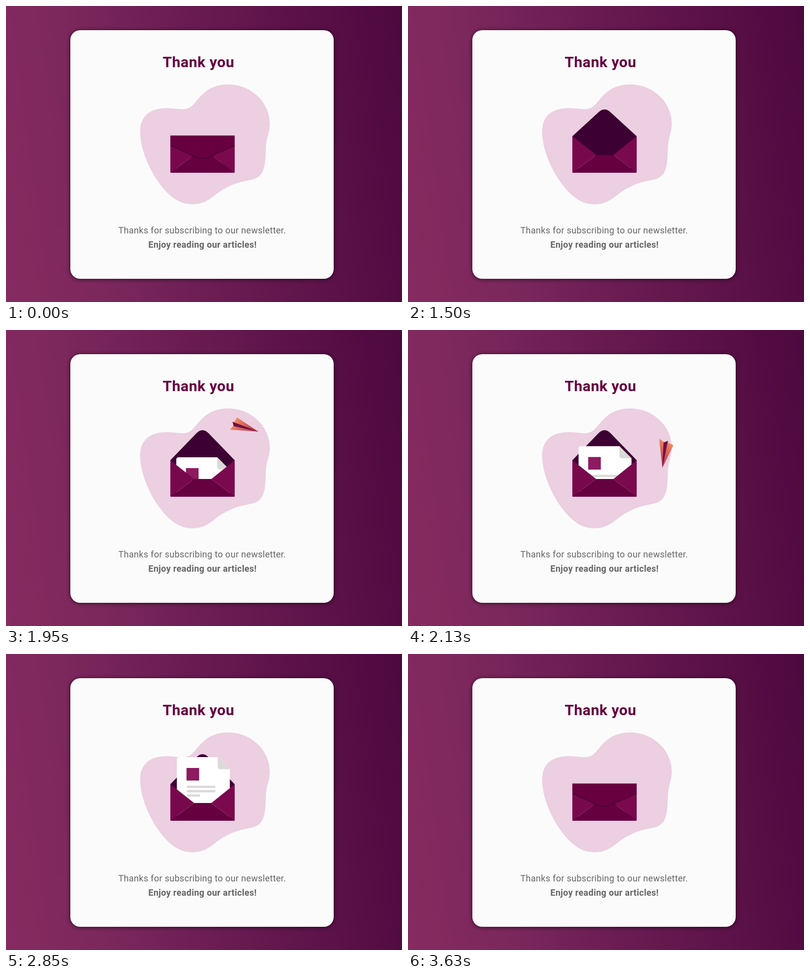
Recreate the animation shown at these times as an HTML page with a canvas. Size 800 by 600 pixels, loop 3900 ms.

```html
<!DOCTYPE html>
<html lang="en">
<head>
<meta charset="utf-8">
<title>Thank you</title>
<style>
  html, body { margin: 0; width: 100%; height: 100%; overflow: hidden; }
  body { position: relative; background: linear-gradient(82deg, #862a60, #7c285d 22%, #671a50 55%, #520b42 92%, #4d0a3f); }
  .card { position: absolute; left: 130px; top: 49px; width: 532px; height: 504px;
    border-radius: 20px; background: #fbfbfb; box-shadow: 0 1px 9px rgba(20, 0, 15, .75); }
  canvas { position: absolute; left: 0; top: 0; }
  p { position: absolute; margin: 0; white-space: nowrap; color: #666;
    font: 18px/30px Roboto, sans-serif; letter-spacing: .3px; }
  .title { left: 316.5px; top: 99px; font-size: 30px; font-weight: 700; letter-spacing: .5px; color: #66003f; }
  .thanks { left: 227px; top: 440px; }
  .enjoy { left: 287.5px; top: 469px; font-weight: 700; }
</style>
</head>
<body>
<div class="card"></div>
<canvas width="800" height="600"></canvas>
<p class="title">Thank you</p>
<p class="thanks">Thanks for subscribing to our newsletter.</p>
<p class="enjoy">Enjoy reading our articles!</p>
<script>
const LOOP = 3900, STEP = 30;
const ctx = document.querySelector('canvas').getContext('2d');
const DARK = '#3d0033', FLAP = '#680040', SIDE = '#78084c', FRONT = '#66003f', GREY = '#dbdad7';

const blob = new Path2D(`M271 258C270 225 288 207 325 207C345 207 362 214 375 203
  C390 190 402 159 449 159C497 159 533 197 533 238C533 256 526 265 525 288
  C524 318 524 344 500 351C482 356 467 355 435 374C419 384 406 402 377 402
  C349 402 328 385 308 357C287 327 272 289 271 258Z`);
const sheet = new Path2D('M0 130V5Q0 0 5 0H82.5L107 24.5V130Z');
const fold = new Path2D('M82.5 0V19Q82.5 24.5 88 24.5H107Z');

// time, tip x, tip y, heading, left wing length, right wing length, half width
const flight = [
  [1590, 365, 292, -155, 52, 52, 16],
  [1650, 310, 254, -120, 55, 50, 18],
  [1710, 308, 190, -71, 58, 46, 20],
  [1740, 337, 166, -56, 58, 47, 20],
  [1830, 425, 158, -15, 54, 51, 17],
  [1950, 510, 206, 18, 50, 56, 14],
  [2100, 524, 268, 85, 49, 57, 15],
  [2280, 425, 331, 165, 47, 58, 16],
  [2340, 375, 337, 181, 47, 59, 16],
  [2430, 322, 326, 196, 47, 59, 16]
];

const clamp = v => Math.max(0, Math.min(1, v));
const progress = (t, start, end) => clamp((t - start) / (end - start));
const mix = (a, b, u) => a + (b - a) * u;
const cubicOut = u => 1 - (1 - u) ** 3;
const backOut = u => 1 + 2.70158 * (u - 1) ** 3 + 1.70158 * (u - 1) ** 2;
const sineInOut = u => (1 - Math.cos(Math.PI * u)) / 2;

function polygon(color, ...points) {
  ctx.fillStyle = color;
  ctx.beginPath();
  for (let i = 0; i < points.length; i += 2) ctx.lineTo(points[i], points[i + 1]);
  ctx.fill();
}

function fillPath(color, path) {
  ctx.fillStyle = color;
  ctx.fill(path);
}

function bar(color, x, y, w, h, r) {
  ctx.fillStyle = color;
  ctx.beginPath();
  ctx.roundRect(x, y, w, h, r);
  ctx.fill();
}

// Smooth curve through the flight keys
function flightAt(t) {
  let i = 0;
  while (i < flight.length - 2 && t > flight[i + 1][0]) i++;
  const a = flight[i], b = flight[i + 1];
  const before = flight[i - 1] || a, after = flight[i + 2] || b;
  const span = b[0] - a[0], u = (t - a[0]) / span;
  return a.slice(1).map((va, k) => {
    const vb = b[k + 1];
    const slopeA = (vb - before[k + 1]) / (b[0] - before[0]) * span;
    const slopeB = (after[k + 1] - va) / (after[0] - a[0]) * span;
    return va + u * slopeA + u * u * (3 * (vb - va) - 2 * slopeA - slopeB)
      + u ** 3 * (2 * (va - vb) + slopeA + slopeB);
  });
}

function drawPlane(t) {
  if (t < 1590 || t > 2430) return;
  const [x, y, heading, left, right, w] = flightAt(t);
  const wing = ctx.createLinearGradient(-10, 4, -55, -12);
  wing.addColorStop(0, '#b63f57');
  wing.addColorStop(.5, '#d8645a');
  wing.addColorStop(1, '#f3965f');
  ctx.save();
  ctx.translate(x, y);
  ctx.rotate(heading * Math.PI / 180);
  ctx.globalAlpha = progress(t, 1590, 1650) * (1 - progress(t, 2360, 2430));
  polygon(wing, 0, 0, -left, -w, -54, w * .1);
  polygon(wing, 0, 0, -52, w * .3, -right, w);
  polygon('#6f1142', 0, 0, -56, -w * .2, -51, w * .35);
  ctx.restore();
}

function drawLetter(t) {
  const y = t < 2700
    ? mix(307, 209, sineInOut(progress(t, 1356, 2543)))
    : mix(209, 307, progress(t, 2880, 3360) ** 3);
  ctx.save();
  ctx.beginPath();
  ctx.rect(333, 150, 128, 187);
  ctx.clip();
  ctx.translate(345 - (y - 216) / 42, y);
  fillPath('#fff', sheet);
  fillPath(GREY, fold);
  bar('#8e1a60', 19.5, 22, 25.5, 25.5, 0);
  [58, 58, 27].forEach((width, i) => bar(GREY, 20, 58 + i * 8.8, width, 4.6, 2));
  ctx.restore();
}

function drawFlap(base, shoulder, tip) {
  const at = k => mix(shoulder, tip, k);
  const closed = tip > base;
  const edge = () => {
    ctx.lineTo(332, shoulder);
    ctx.lineTo(385, at(.9));
    ctx.quadraticCurveTo(397, at(1.1), 409, at(.9));
    ctx.lineTo(462, shoulder);
  };
  ctx.fillStyle = closed ? FLAP : DARK;
  ctx.beginPath();
  ctx.moveTo(332, base);
  edge();
  ctx.lineTo(462, base);
  ctx.fill();
  if (!closed) return;
  ctx.strokeStyle = '#4b0034';
  ctx.lineWidth = 1.8;
  ctx.beginPath();
  edge();
  ctx.stroke();
}

function drawPocket() {
  polygon(SIDE, 332, 264, 380, 302, 332, 338);
  polygon('#7b094e', 462, 264, 415, 302, 462, 338);
  polygon(FRONT, 332, 338, 380, 302, 415, 302, 462, 338);
}

function draw(t) {
  const open = t < 3240
    ? cubicOut(progress(t, 1200, 1700))
    : 1 - backOut(progress(t, 3240, 3630));
  const base = mix(262.5, 264, clamp(open * 6));
  const shoulder = mix(283, base, Math.min(1, open * 2));
  const tip = 309 - 106 * open;
  const flap = () => drawFlap(base, shoulder, tip);

  ctx.clearRect(0, 0, 800, 600);
  fillPath('#eccfe1', blob);
  if (t < 1800) drawPlane(t);
  polygon(DARK, 332, 264, 462, 264, 462, 337, 332, 337);
  if (tip <= base) flap();
  drawLetter(t);
  drawPocket();
  if (tip > base) flap();
  if (t >= 1800) drawPlane(t);
}

function tick() {
  const t = performance.now() % LOOP;
  draw(Math.floor(t / STEP) * STEP);
  requestAnimationFrame(tick);
}
tick();
</script>
</body>
</html>
```
